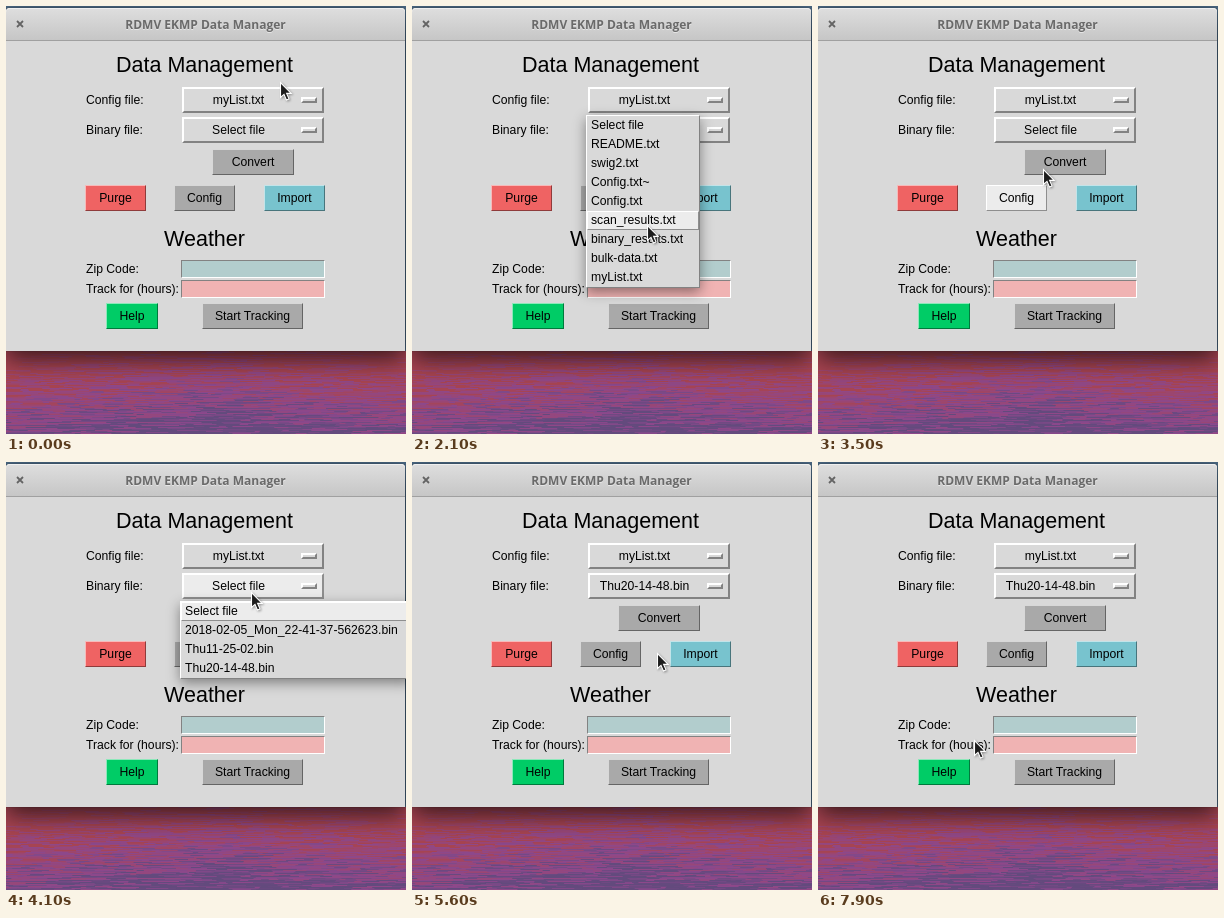
Write an HTML page with a canvas that moves like this. It is 400x428 px and loops after 8 s.

```html
<!DOCTYPE html>
<html lang="en">
<head>
<meta charset="utf-8">
<title>Data Manager</title>
<style>
  html, body { margin: 0; width: 100%; height: 100%; overflow: hidden; }
  body { position: relative; background: #4c6a85; font: 12.2px "Liberation Sans", Arial, sans-serif; color: #000; }
  body * { position: absolute; box-sizing: border-box; white-space: pre; }
  #wall { left: 0; top: 0; }
  #window {
    left: 0; top: 2px; width: 399px; height: 343px; background: #d9d9d9;
    border-radius: 4px 4px 0 0; box-shadow: 0 8px 24px rgba(0, 0, 0, .65), 0 0 1px #222;
  }
  #bar {
    left: 0; top: 2px; width: 399px; height: 33px; border-radius: 4px 4px 0 0;
    background: linear-gradient(#dedede, #c6c6c6); border-bottom: 1px solid #a0a0a0;
    box-shadow: inset 0 1px #efefef; color: #6a6a6a; text-shadow: 0 1px #e6e6e6;
    font: bold 12px/33px "Open Sans", sans-serif; text-align: center;
  }
  #close { left: 10px; top: 14px; }
  .label { line-height: 20px; }
  .title { font-size: 21.5px; line-height: 30px; text-align: center; }
  .button, .option, .field, .menu, .row, .mark {
    --light: color-mix(in srgb, var(--c), white 55%);
    --dark: color-mix(in srgb, var(--c), black 40%);
    background: var(--c); border: 1px solid;
    border-color: var(--light) var(--dark) var(--dark) var(--light);
  }
  .button, .option { display: flex; align-items: center; justify-content: center; }
  .option, .mark, .menu { --c: #d9d9d9; --light: #fff; }
  .option, .mark { border-width: 2px; }
  .option { padding-right: 29px; }
  .option span { position: static; }
  .field { border-color: #828282 #fff #fff #828282; }
  .button.hot, .option.hot, .row.hot { --c: #ececec; --light: #fff; }
  .button.down { border-color: var(--dark) var(--light) var(--light) var(--dark); }
  .menu { box-shadow: 0 4px 12px rgba(0, 0, 0, .42); }
  .row { --c: #d9d9d9; left: 0; right: 0; height: 19px; padding-left: 3px; line-height: 17px; }
  .row:not(.hot) { border-color: transparent; }
  #cursor { left: -1px; top: -1px; overflow: visible; filter: drop-shadow(1px 1px 1px rgba(0, 0, 0, .35)); }
</style>
</head>
<body>
<canvas id="wall" width="400" height="428"></canvas>
<div id="window"></div>
<div id="bar">RDMV EKMP Data Manager</div>
<svg id="close" width="8" height="8"><path d="M1 1L7 7M7 1L1 7" stroke="#646464" stroke-width="1.8"/></svg>
<svg id="cursor" width="14" height="21">
  <path d="M.5 .5V15.5L4 12.4L6.4 18L9 16.9L6.6 11.4H11.2Z" fill="#1c1c1c" stroke="#fff" stroke-width="1.1"/>
</svg>
<script>
const LOOP = 8000, STEP = 100, ROW = 19;
const GRAY = '#a9a9a9';
const cursor = document.getElementById('cursor');
const hoverable = [];

function box(kind, x, y, w, h, text = '', color = '') {
  const el = document.createElement('div');
  el.className = kind;
  el.style.cssText = `left:${x}px;top:${y}px;width:${w}px;height:${h}px`;
  if (color) el.style.background = color, el.style.setProperty('--c', color);
  el.textContent = text;
  document.body.insertBefore(el, cursor);
  return el;
}

function addHover(el, x, y, w, h) {
  const contains = ([px, py]) => px >= x && px < x + w && py >= y && py < y + h;
  hoverable.push({ el, contains });
  return el;
}

function button(x, y, w, text, color = GRAY) {
  const el = box('button', x, y, w, 26, text);
  el.style.setProperty('--base', color);
  return addHover(el, x, y, w, 26);
}

function option(y, text) {
  const el = addHover(box('option', 176, y, 142, 26), 176, y, 142, 26);
  const label = el.appendChild(document.createElement('span'));
  label.textContent = text;
  box('mark', 295, y + 10, 16, 6);
  return { el, label };
}

function menu(owner, y, w, items) {
  const el = box('menu', 174, y, w, items.length * ROW + 2);
  items.forEach((text, i) => {
    const row = el.appendChild(document.createElement('div'));
    row.className = 'row';
    row.style.top = i * ROW + 'px';
    row.textContent = text;
  });
  return { owner, el, top: y + 1, rows: [...el.children] };
}

// Red streaks that turn violet towards the bottom centre.
function paintWall() {
  const g = document.getElementById('wall').getContext('2d');
  let seed = 7;
  const rand = () => (seed = seed * 16807 % 2147483647) / 2147483647;
  const tone = (x, depth, noise) => {
    const cool = Math.min(1, Math.max(0, depth * 1.1 - .3 * Math.abs(x / 200 - 1) + noise));
    return `hsl(${352 - 82 * cool} ${42 - 16 * cool}% ${46 - 7 * cool}%)`;
  };
  g.fillStyle = '#4c6a85';
  g.fillRect(0, 0, 400, 345);
  for (let y = 345; y < 428; y++) {
    const depth = (y - 345) / 83;
    for (let x = -20 * rand(); x < 400;) {
      const length = 5 + rand() * 20;
      g.fillStyle = tone(x, depth, (rand() - .5) * .75);
      g.fillRect(x, y, length + 1, 1);
      x += length;
    }
  }
}

paintWall();
box('title', 0, 44, 397, 30, 'Data Management');
box('title', 0, 218, 397, 30, 'Weather');
box('label', 80, 84, 90, 20, 'Config file:');
box('label', 80, 114, 90, 20, 'Binary file:');
box('label', 80, 253, 90, 20, 'Zip Code:');
box('label', 80, 273, 95, 20, 'Track for (hours):');
const configOption = option(81, 'myList.txt');
const binaryOption = option(111, 'Select file');
const convert = button(206, 143, 82, 'Convert');
button(79, 179, 61, 'Purge', '#ef6363');
button(168, 179, 61, 'Config');
button(258, 179, 61, 'Import', '#78c3ce');
box('field', 175, 254, 144, 18, '', '#b2cdcd');
box('field', 175, 274, 144, 18, '', '#f0b3b3');
button(100, 297, 52, 'Help', '#00cc66');
button(196, 297, 101, 'Start Tracking');
const configMenu = menu(configOption.el, 109, 114, ['Select file', 'README.txt', 'swig2.txt', 'Config.txt~',
  'Config.txt', 'scan_results.txt', 'binary_results.txt', 'bulk-data.txt', 'myList.txt']);
const binaryMenu = menu(binaryOption.el, 139, 232, ['Select file', '2018-02-05_Mon_22-41-37-562623.bin',
  'Thu11-25-02.bin', 'Thu20-14-48.bin']);

// Cursor legs: start time, number of steps, end point.
const origin = [275, 77];
const legs = [
  [400, 2, 283, 62],
  [1000, 5, 261, 91],
  [1800, 5, 235, 225],
  [2400, 4, 281, 259],
  [2900, 2, 271, 270],
  [3400, 1, 224, 196],
  [3500, 1, 226, 164],
  [3600, 3, 246, 131],
  [4400, 4, 247, 200],
  [5600, 1, 246, 192],
  [5700, 1, 260, 173],
  [5800, 2, 292, 173],
  [6100, 2, 266, 150],
  [7200, 8, 157, 279],
];

function cursorAt(t) {
  let [x, y] = origin;
  for (const [start, steps, toX, toY] of legs) {
    if (t < start) break;
    const p = Math.min(1, ((t - start) / STEP + 1) / steps);
    const eased = 1 - (1 - p) ** 2;
    x += (toX - x) * eased;
    y += (toY - y) * eased;
  }
  return [Math.round(x), Math.round(y)];
}

function showMenu({ el, top, rows }, t, from, to, first, y) {
  const open = t >= from && t < to;
  el.style.display = open ? '' : 'none';
  el.style.opacity = t < from + STEP ? .6 : 1;
  const active = y < top ? first : Math.floor((y - top) / ROW);
  rows.forEach((row, i) => row.classList.toggle('hot', i === active));
  return open;
}

function draw() {
  const t = Math.floor(performance.now() % LOOP / STEP) * STEP;
  const [x, y] = cursorAt(t);
  cursor.style.transform = `translate(${x}px,${y}px)`;

  const configOpen = showMenu(configMenu, t, 1600, 3200, 8, y);
  const binaryOpen = showMenu(binaryMenu, t, 4000, 5100, 0, y);
  const owner = configOpen ? configMenu.owner : binaryOpen ? binaryMenu.owner : null;

  // Hover feedback trails the cursor by one step; an open menu blocks other controls.
  const trail = cursorAt(t - STEP);
  for (const { el, contains } of hoverable) {
    el.classList.toggle('hot', contains(trail) && (!owner || el === owner));
  }
  convert.classList.toggle('down', t === 6500);
  binaryOption.label.textContent = t < 5100 ? 'Select file' : 'Thu20-14-48.bin';
  requestAnimationFrame(draw);
}

const baseColor = document.createElement('style');
baseColor.textContent = '.button:not(.hot) { --c: var(--base); }';
document.head.append(baseColor);
draw();
</script>
</body>
</html>
```
